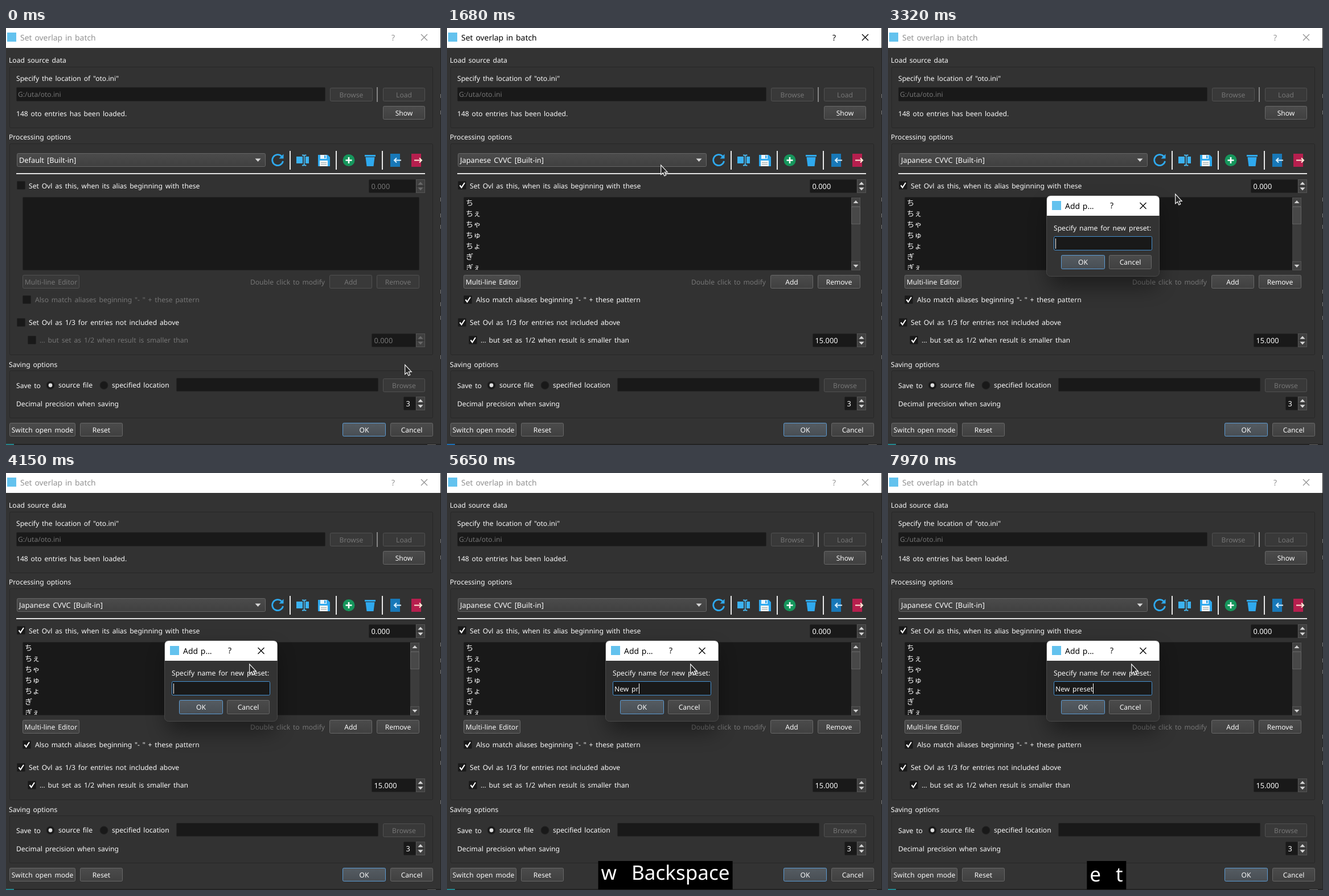
Write an HTML page that moves like this. It is 764 by 733 pixels and loops after 8000 ms.

```html
<!DOCTYPE html>
<html lang="en">
<head>
<meta charset="utf-8">
<title>Set overlap in batch</title>
<style>
html, body { margin: 0; width: 100%; height: 100%; overflow: hidden; background: #222; }
svg { position: absolute; left: 0; top: 0; display: block; }
text {
  font: 12.1px "Noto Sans", "Open Sans", sans-serif;
  word-spacing: 1.7px;
  white-space: pre;
  text-rendering: geometricPrecision;
  fill: #fafafa;
}
text.off { fill: #757575; }
text.value { font-size: 12.8px; }
text.title { font-size: 13.9px; word-spacing: 1.3px; fill: #000; }
text.kana { font: 13.3px "Noto Sans CJK JP", "Noto Sans CJK", sans-serif; }
.mid { text-anchor: middle; }
#keys {
  position: absolute; left: 383.5px; top: 682px; height: 50px;
  transform: translateX(-50%);
  display: flex; gap: 26px; padding: 0 5.5px;
  background: #000; color: #fff; white-space: nowrap;
  font: 35px "Noto Sans", "Open Sans", sans-serif;
  text-rendering: geometricPrecision;
}
</style>
</head>
<body>
<svg id="stage" width="764" height="733" viewBox="0 0 764 733"></svg>
<div id="keys"></div>
<script>
const LOOP = 8000;
const BLUE = '#2fa9ee';

// ---- drawing helpers: each returns markup ----
const rect = (x, y, w, h, fill, more = '') =>
  `<rect x="${x}" y="${y}" width="${w}" height="${h}" fill="${fill}" ${more}/>`;
const path = (d, stroke, width = 1, fill = 'none') =>
  `<path d="${d}" stroke="${stroke}" stroke-width="${width}" fill="${fill}"/>`;
const text = (x, y, s, cls = '', more = '') =>
  `<text x="${x}" y="${y}" class="${cls}" ${more}>${s}</text>`;
const group = (id, body, more = '') => `<g id="${id}" ${more}>${body}</g>`;
const frame = (y, h) => rect(6.5, y + .5, 743, h - 1, '#323232', 'rx="2" stroke="#272727"');
const field = (x, y, w, h) => rect(x + .5, y + .5, w - 1, h - 1, '#191919', 'rx="1.5" stroke="#232323"');

function button(x, y, w, h, label, kind = '') {
  const edge = kind === 'main' ? '#5c9bd3' : kind === 'off' ? '#515151' : '#686868';
  const face = kind === 'off' ? '#393939' : kind === 'main' ? 'url(#mainFace)' : 'url(#face)';
  return rect(x + .5, y + .5, w - 1, h - 1, face, `rx="2" stroke="${edge}"`) +
    text(x + w / 2, y + h / 2 + 4.5, label, 'mid ' + (kind === 'off' ? 'off' : ''));
}

function spin(x, y, w, value, off) {
  const c = off ? '#6a6a6a' : '#d8d8d8', bx = x + w, m = bx + 8;
  return field(x, y, w, 24) + text(x + 4.5, y + 16.5, value, off ? 'value off' : 'value') +
    rect(bx + .5, y + .5, 15, 23, '#404040', 'stroke="#555"') +
    path(`M${m - 4.5} ${y + 9.5}h9l-4.5 -5z M${m - 4.5} ${y + 14.5}h9l-4.5 5z`, 'none', 0, c) +
    path(`M${bx + 1} ${y + 12}h14`, '#2b2b2b');
}

const box = (x, y) => rect(x + .5, y + .5, 14, 14, '#191919', 'rx="1" stroke="#222"');
const tick = (x, y) => path(`M${x + 3.5} ${y + 7.5}l3 4l5.5 -8.5`, '#fff', 2.1);
const logo = (x, y) => rect(x, y, 16, 16, '#63c2ee');
const cross = (x, y) => path(`M${x - 5.5} ${y - 5.5}l11 11m0 -11l-11 11`, 'currentColor', 1.3);
const radio = (x, on) => `<circle cx="${x}" cy="628" r="7" fill="#191919" stroke="#242424"/>` +
  (on ? `<circle cx="${x}" cy="628" r="3.4" fill="#dedede"/>` : '');
const rule = x => rect(x, 216, 2, 33, '#e8e8e8');
const hover = (id, x) =>
  group(id, rect(x + .5, 216.5, 31, 31, '#4a4a4a', 'rx="2" stroke="#636363"'));

function icons() {
  return path('M484 225.500A9.500 9.500 0 1 0 486.500 234', BLUE, 2.8) +
    path('M479.500 229.500h8v-8z', 'none', 0, BLUE) +
    rect(510, 226, 22, 12, '#3bb2f2') + rect(521, 222, 5, 21, '#323232') +
    path('M520 223.5h2.5l1.2 1.5l1.2 -1.5h2.5m-3.7 1v16m-3.7 1h2.5l1.2 -1.5l1.2 1.5h2.5', '#49b9f2', 1.8) +
    path('M548 223h17l4 4v16h-21z', 'none', 0, BLUE) +
    rect(552, 223, 11, 7, '#eaf4fb') + rect(559, 224, 2.5, 5, BLUE) +
    rect(551, 233, 14, 10, '#f4f4f4') + path('M553 236.5h10m-10 3h10', '#9aa', 1) +
    '<circle cx="602" cy="232.5" r="10.5" fill="#16965c"/>' +
    path('M602 227v11m-5.5 -5.5h11', '#fff', 2.6) +
    path('M630 223h19v3h-19z M631.5 227h16l-2 16h-12z', 'none', 0, BLUE) +
    rect(675, 221, 17, 23, '#1878b8') + path('M694 232.5h-12m4 -4l-4 4l4 4', '#d8f0ff', 2) +
    rect(712, 221, 17, 23, '#b61f4e') + path('M717 232.5h13m-4 -4l4 4l-4 4', '#ffe9d8', 2);
}

// Widgets that depend on the chosen preset.
function preset(on) {
  const off = on ? '' : 'off';
  let s = text(23, 236.5, on ? 'Japanese CVVC [Built-in]' : 'Default [Built-in]', 'value') +
    spin(637, 266, 83, '0.000', !on) +
    button(29, 434, 100, 24, 'Multi-line Editor', off) +
    button(568, 434, 75, 24, 'Add', off) + button(651, 434, 75, 24, 'Remove', off) +
    text(51, 482, 'Also match aliases beginning "- " + these pattern', off) +
    text(59, 553, '... but set as 1/2 when result is smaller than', off) +
    spin(642, 537, 78, on ? '15.000' : '0.000', !on);
  if (!on) return s;
  s += tick(19, 269) + tick(29, 470) + tick(19, 510) + tick(38, 541);
  const rows = ['ち', 'ちぇ', 'ちゃ', 'ちゅ', 'ちょ', 'ぎ', 'ぎぇ'];
  s += `<g clip-path="url(#list)">${rows.map((r, i) => text(33, 312 + 19 * i, r, 'kana')).join('')}</g>`;
  return s + rect(710, 298, 16, 128, '#3c3c3c') +
    [298, 410].map(y => rect(710.5, y + .5, 15, 15, '#424242', 'stroke="#555"')).join('') +
    rect(710.5, 314.5, 15, 30, '#484848', 'stroke="#606060"') +
    path('M713.5 308h9l-4.5 -5z M713.5 416h9l-4.5 5z', 'none', 0, '#cfcfcf');
}

const defs = `<defs>
  <linearGradient id="face" x2="0" y2="1"><stop stop-color="#4b4b4b"/><stop offset="1" stop-color="#404040"/></linearGradient>
  <linearGradient id="mainFace" x2="0" y2="1"><stop stop-color="#555c62"/><stop offset="1" stop-color="#484e54"/></linearGradient>
  <clipPath id="list"><rect x="29" y="298" width="681" height="127"/></clipPath>
  <filter id="shade" x="-50%" y="-50%" width="200%" height="220%"><feGaussianBlur stdDeviation="18"/></filter>
</defs>`;

const win = rect(0, 0, 763, 731, '#333') + rect(0, 0, 763, 35, '#fff') + logo(2, 8) +
  group('bar', text(25, 22, 'Set overlap in batch', 'title', 'style="fill:currentColor"') +
    text(680, 21.5, '?', 'title mid', 'style="fill:currentColor"') + cross(734.5, 16.5)) +
  text(5, 61, 'Load source data') + frame(68, 108) +
  text(18, 93, 'Specify the location of "oto.ini"') +
  field(18, 104, 543, 25) + text(21, 121, 'G:/uta/oto.ini', 'off') +
  button(569, 105, 75, 24, 'Browse', 'off') + rect(651.5, 104, 1, 26, '#d8d8d8') +
  button(662, 105, 74, 24, 'Load', 'off') +
  text(18, 154.5, '148 oto entries has been loaded.') + button(662, 137, 74, 24, 'Show') +
  text(5, 196, 'Processing options') + frame(203, 372) +
  rect(19.5, 220.5, 436, 23, 'url(#face)', 'rx="2" stroke="#666"') +
  path('M437.5 229.5h10l-5 5.5z', 'none', 0, '#d8d8d8') +
  [498, 579, 660].map(rule).join('') + hover('hotName', 505) + hover('hotSave', 542) + hover('hotAdd', 586) + icons() +
  rect(18, 255, 718, 2, '#e2e2e2') +
  box(19, 269) + text(40, 281.5, 'Set Ovl as this, when its alias beginning with these') +
  field(29, 297, 697, 129) + text(560, 451, 'Double click to modify', 'off', 'text-anchor="end"') +
  box(29, 470) + box(19, 510) + box(38, 541) +
  text(40, 522, 'Set Ovl as 1/3 for entries not included above') +
  group('plain', preset(false)) + group('chosen', preset(true)) +
  text(5, 595.5, 'Saving options') + frame(602, 84) +
  text(18, 632.5, 'Save to') + radio(78, true) + text(92, 632, 'source file') +
  radio(172, false) + text(186, 632, 'specified location') +
  field(299, 615, 355, 24) + button(662, 616, 74, 24, 'Browse', 'off') +
  text(18, 665, 'Decimal precision when saving') + spin(698, 648, 22, '3', false) +
  button(6, 694, 116, 24, 'Switch open mode') + button(130, 694, 75, 24, 'Reset') +
  button(591, 694, 76, 24, 'OK', 'main') + button(675, 694, 75, 24, 'Cancel') +
  rect(0, 731, 764, 2, '#232323') + rect(0, 731, 14, 2, '#23858c', 'id="strip"') + rect(740, 732, 15, 1, '#666') +
  rect(763, 0, 1, 731, '#242424') +
  [116, 145, 298, 326, 346, 460, 482, 506, 575].map(y => rect(763, y, 1, 7, '#777')).join('');

const popup = group('popup',
  rect(19.5, 245.5, 436, 59, '#232323', 'stroke="#4c4c4c"') +
  rect(20, 246, 435, 29, '#2a82da', 'id="hot"') +
  text(23, 264.5, 'Default [Built-in]', 'value') + text(23, 294.5, 'Japanese CVVC [Built-in]', 'value'));

const dialog = group('dialog',
  rect(283, 312, 190, 142, '#000', 'rx="8" opacity=".42" filter="url(#shade)"') +
  rect(278.5, 294.5, 198, 142, '#333', 'rx="7" stroke="#484848"') +
  path('M279 330v-28q0 -7 7 -7h183.5q7 0 7 7v28z', 'none', 0, '#fff') + logo(288, 304) +
  text(311, 317.5, 'Add p...', 'title') + text(393, 317, '?', 'title mid') + cross(448, 312.5) +
  text(291, 356, 'Specify name for new preset:') +
  rect(291.5, 366.5, 172, 24, '#191919', 'rx="2" stroke="#4690d0"') +
  text(294, 384, '', '', 'id="name"') + rect(294, 370, 1, 18, '#fff', 'id="caret"') +
  button(304, 399, 77, 25, 'OK', 'main') + button(388, 399, 75, 25, 'Cancel'));

const pointer = group('pointer',
  path('M.7 1v16.8l3.8 -3.3l2.4 5.4l2.8 -1.2l-2.4 -5.3h4.9z', '#f4f4f4', 1.2, '#262626'));

document.getElementById('stage').innerHTML = defs + win + popup + dialog + pointer;

// ---- timeline ----
const route = [
  [40, 700, 591], [780, 380, 234], [1230, 380, 234], [1430, 374, 285], [1540, 374, 285],
  [1680, 375, 240], [1850, 375, 240], [2000, 492, 238], [2160, 557, 247], [2700, 557, 247],
  [2820, 593, 242], [3110, 593, 242], [3490, 440, 326], [3650, 427, 335]
];
const typed = [
  [0, ''], [4400, 'N'], [4780, 'Ne'], [5030, 'New'], [5280, 'New '], [5380, 'New p'], [5480, 'New pr'],
  [5900, 'New prw'], [6170, 'New prwr'], [6420, 'New prw'], [6520, 'New pr'], [6630, 'New pre'],
  [7040, 'New pres'], [7210, 'New prese'], [7380, 'New preset']
];
const pressed = [
  [0, ''], [4320, 'Left Shift'], [4400, 'Left Shift,N'], [4780, 'Left Shift,N,e'], [5030, 'Left Shift,N,e,w'],
  [5280, 'N,e,w,Backspace'], [5480, 'e,w,Backspace'], [5650, 'w,Backspace'], [5900, 'w,Backspace,w'],
  [5970, 'Backspace,w'], [6170, 'Backspace,w,r'], [6260, 'w,r'], [6420, 'w,r,Backspace'],
  [6630, 'w,r,Backspace,e'], [6790, 'r,Backspace,e'], [7040, 'Backspace,e,s'], [7210, 'Backspace,e,s,e'],
  [7380, 'e,s,e,t'], [7510, 's,e,t'], [7930, 'e,t']
];

const $ = id => document.getElementById(id);
const show = (id, on) => { $(id).style.display = on ? '' : 'none'; };
const clamp = v => Math.max(0, Math.min(1, v));
const ease = v => v * v * (3 - 2 * v);
const within = (t, a, b) => t >= a && t < b;
const latest = (steps, t) => steps.filter(s => s[0] <= t).pop()[1];

function place(t) {
  const i = route.findIndex(p => p[0] > t);
  if (i === 0) return route[0].slice(1);
  if (i < 0) return route[route.length - 1].slice(1);
  const [a, x, y] = route[i - 1], [b, u, v] = route[i];
  const k = ease((t - a) / (b - a));
  return [x + (u - x) * k, y + (v - y) * k];
}

let lastKeys = null;
function showKeys(list) {
  if (list === lastKeys) return;
  lastKeys = list;
  const el = $('keys');
  el.style.display = list ? '' : 'none';
  // Lines with a descender sit higher in the box.
  el.style.lineHeight = list.includes('p') ? '41px' : '47px';
  el.innerHTML = list.split(',').map(k => `<span>${k}</span>`).join('');
}

function draw(t) {
  const [x, y] = place(t).map(Math.round);
  const active = within(t, 780, 3110);
  $('pointer').setAttribute('transform', `translate(${x} ${y})`);
  $('bar').style.color = active ? '#000' : '#929292';
  $('strip').setAttribute('fill', active ? '#1c6fb5' : '#23858c');

  show('plain', t < 1500);
  show('chosen', t >= 1500);
  show('popup', within(t, 860, 1500));
  $('popup').style.opacity = clamp((t - 820) / 200);
  $('hot').setAttribute('y', y < 275 ? 246 : 275);

  const onBar = within(t, 1850, 3110) && y < 249;
  show('hotName', onBar && within(x, 505, 537));
  show('hotSave', onBar && within(x, 542, 574));
  show('hotAdd', onBar && within(x, 586, 618));

  show('dialog', t >= 3110);
  $('dialog').style.opacity = clamp((t - 3080) / 180);
  $('name').textContent = latest(typed, t);
  const end = t < 4400 ? 0 : $('name').getComputedTextLength();
  $('caret').setAttribute('x', Math.round(294 + end));
  show('caret', !within(t, 3620, 4150));
  showKeys(latest(pressed, t));
}

const start = performance.now();
function loop() {
  draw((performance.now() - start) % LOOP);
  requestAnimationFrame(loop);
}
loop();
</script>
</body>
</html>
```
